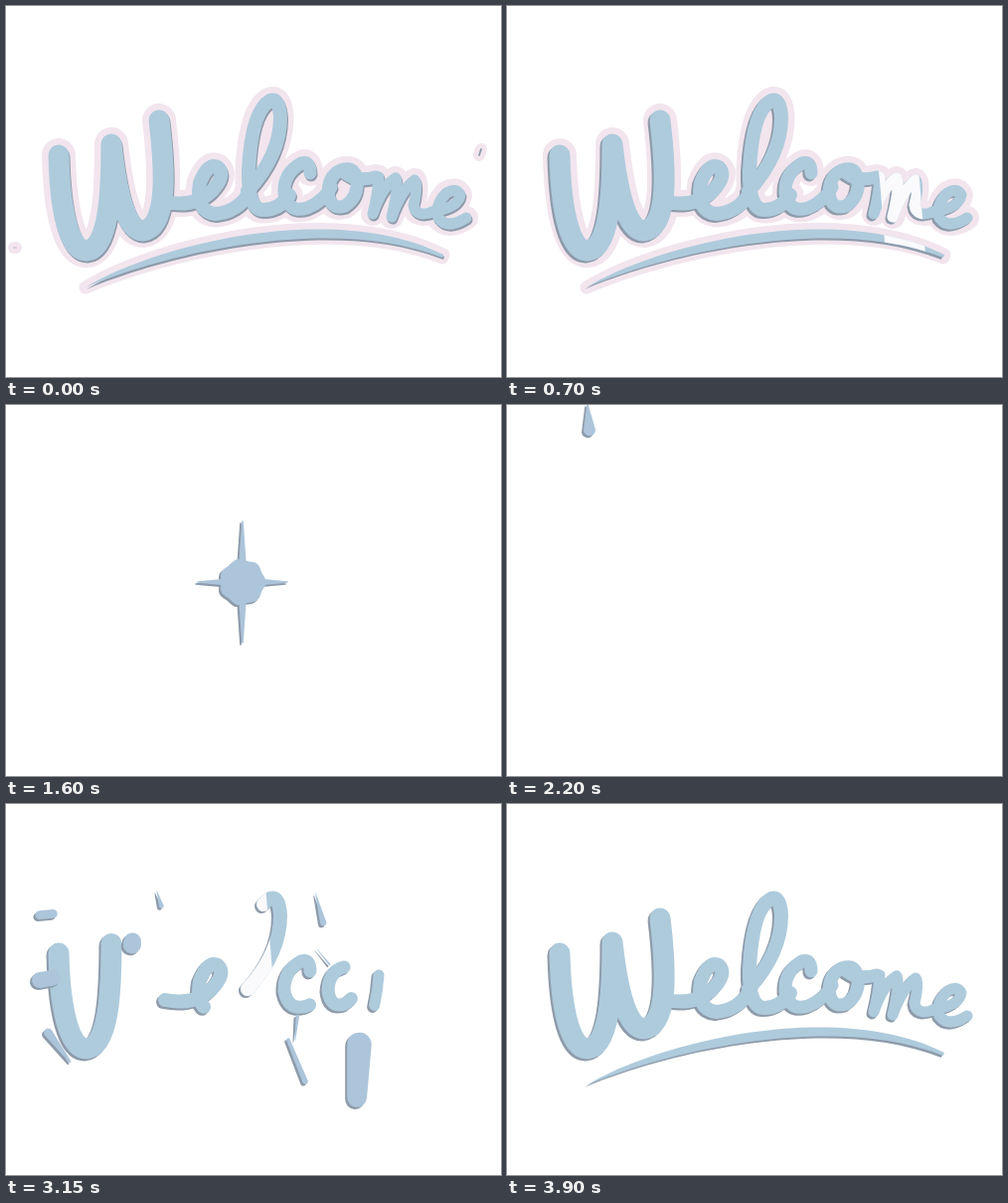
An HTML page with a canvas that plays this animation: 498 by 373 pixels, repeating every 3.95 s.

```html
<!DOCTYPE html>
<html lang="en">
<head>
<meta charset="utf-8">
<title>Welcome</title>
<style>
html, body { margin: 0; width: 100%; height: 100%; overflow: hidden; background: #fff; }
canvas { display: block; }
</style>
</head>
<body>
<canvas id="stage" width="498" height="373"></canvas>
<script>
const ctx = document.getElementById('stage').getContext('2d');
const LOOP = 3950, STEP = 50, MELTED = 1600, CX = 238, CY = 178;
const FACE = '#aecbdc', LIQUID = '#acc5da', SHADE = '#8e9baa', HALO = '#f2e5ee', SHINE = '#fafafd';

// Centre line of each letter, drawn with a round brush.
const letter = (width, d) => ({ width, path: new Path2D(d) });
const letters = [
  letter(21, 'M53 150C54 195 61 246 81 246C104 244 106 185 106 139C110 175 118 226 138 226C163 222 160 165 154 115'),
  letter(14, 'M160 197Q190 203 207 186Q222 170 213 162Q203 157 195 178Q190 207 211 209Q232 207 243 190'),
  letter(14, 'M243 186Q276 150 276 112Q275 92 266 95Q247 105 244 165Q243 205 259 205Q275 205 285 190'),
  letter(13, 'M306 168Q306 155 297 158Q279 168 280 188Q284 209 303 203Q320 196 327 182'),
  letter(13, 'M340 164Q325 168 324 187Q326 206 341 201Q355 192 353 174Q350 160 338 165Q350 178 372 172'),
  letter(11, 'M375 172Q374 190 369 209Q378 182 392 173Q396 178 388 212Q398 185 411 175Q415 180 410 200Q412 214 432 206'),
  letter(11, 'M428 207Q455 203 457 190Q453 182 443 188Q431 200 435 213Q444 225 463 213')
];
const swoosh = new Path2D('M219 238C150 250 60 278 62 299C70 312 130 304 180 291');
const swooshTail = new Path2D('M180 290C240 280 300 275 355 298');

const ramp = (t, from, to) => Math.max(0, Math.min(1, (t - from) / (to - from)));
const lerp = (a, b, k) => a + (b - a) * k;

// Hull of two circles: a capsule, drop or spike.
function taper(x1, y1, r1, x2, y2, r2, color) {
  const a = Math.atan2(y2 - y1, x2 - x1), quarter = Math.PI / 2;
  ctx.fillStyle = color;
  ctx.beginPath();
  ctx.arc(x1, y1, r1, a + quarter, a + 3 * quarter);
  ctx.arc(x2, y2, r2, a - quarter, a + quarter);
  ctx.fill();
}

function line(path, width, color, dash = []) {
  ctx.setLineDash(dash);
  ctx.lineWidth = width;
  ctx.strokeStyle = color;
  ctx.stroke(path);
  ctx.setLineDash([]);
}

function clipBand(left, width) {
  const slant = .08, top = left - 200 * slant, bottom = left + 173 * slant;
  ctx.beginPath();
  ctx.moveTo(top, 0);
  ctx.lineTo(top + width, 0);
  ctx.lineTo(bottom + width, 373);
  ctx.lineTo(bottom, 373);
  ctx.clip();
}

// Face over an offset shade, with bands of light on top.
function relief(draw, face, bands = [], dx = -2) {
  ctx.save();
  ctx.translate(dx, 2);
  draw(SHADE);
  ctx.restore();
  draw(face);
  for (const [left, width] of bands) {
    ctx.save();
    clipBand(left, width);
    draw(SHINE);
    ctx.restore();
  }
}

// The light crosses the stage twice in a loop at the same speed.
const shineLeft = t => t < MELTED ? 377 + .826 * (t - 700) : 437 + .826 * (t - 3400);

function underline(color, spread, sag, shown) {
  ctx.save();
  if (shown < 1) {
    ctx.beginPath();
    ctx.rect(0, 0, lerp(75, 450, shown), 373);
    ctx.clip();
  }
  const crescent = new Path2D(`M80 283C150 ${240 + sag} 330 ${195 + sag} 440 250
    L439 253C330 ${209 + sag} 160 ${248 + sag} 80 283`);
  ctx.fillStyle = color;
  ctx.fill(crescent);
  if (spread) line(crescent, spread, color);
  ctx.restore();
}

function word(t) {
  const leaving = t < MELTED;
  const melt = leaving ? ramp(t, 1150, 1560) ** 2 : 0, scale = 1 - .97 * melt;
  const sag = leaving ? 12 * ramp(t, 850, 1150) : 0;
  const shown = leaving ? 1 : ramp(t, 3450, 3700);
  const draw = (color, spread = 0) => {
    ctx.save();
    ctx.translate(CX, CY);
    ctx.scale(scale, scale);
    ctx.translate(-CX, -CY);
    if (shown) underline(color, spread, sag, shown);
    letters.forEach(({ width, path }, i) => {
      const written = leaving ? 1 : ramp(t, 3000 + i * 25, 3330);
      const dash = written < 1 ? [width * 23 * written, 999] : [];
      if (written) line(path, width * (1 + melt / 2) + spread, color, dash);
    });
    if (t > 3200 && t < 3650) {
      line(swoosh, 6, color, [300 * ramp(t, 3200, 3400) * (1 - ramp(t, 3400, 3650)), 999]);
    }
    ctx.restore();
  };
  if (t < 1150) draw(HALO, 13);
  relief(draw, FACE, [[shineLeft(t), 40]], t < STEP ? 1 : -2);
}

function splat(t) {
  const grow = ramp(t, 1350, MELTED), fly = ramp(t, 1650, 2050), size = grow * (1 - fly);
  relief(color => {
    for (let i = 0; i < 4; i++) {
      const a = i * Math.PI / 2, root = 80 * fly, tip = lerp((i % 2 ? 61 : 45) * grow, 80, fly);
      taper(CX + root * Math.cos(a), CY + root * Math.sin(a), 5 * size,
        CX + tip * Math.cos(a), CY + tip * Math.sin(a), .8 * size, color);
    }
    ctx.beginPath();
    for (let a = 0; a < Math.PI * 2; a += .05) {
      const r = (22.5 + Math.cos(7 * a)) * size;
      ctx.lineTo(CX + r * Math.cos(a), CY + r * Math.sin(a));
    }
    ctx.fillStyle = color;
    ctx.fill();
  }, LIQUID);
}

function rain(t) {
  for (let i = 0; i < 5; i++) {
    const y = 25 + .9 * (t - 2200 - i * 60), x = 83 + i * 97;
    relief(color => taper(x - 2, y - 25, .8, x, y, 6, color), LIQUID);
  }
}

// Pieces drift in from the edges, then shrink into the place of the word.
function liquid(t) {
  const join = ramp(t, 2900, 3250) ** 1.5, size = 1 - join, wait = Math.max(0, 2900 - t);
  const left = shineLeft(t), bands = [[left - 31, 15], [left, 40]];
  const piece = (x1, y1, r1, x2, y2, r2) => {
    const midX = (x1 + x2) / 2, midY = (y1 + y2) / 2;
    const away = Math.atan2(midY - CY, midX - CX), drift = .5 * wait;
    const x = lerp(midX + drift * Math.cos(away), lerp(midX, CX, .3), join);
    const y = lerp(midY + drift * Math.sin(away), lerp(midY, CY, .8), join);
    const halfX = (x2 - x1) / 2 * size, halfY = (y2 - y1) / 2 * size;
    relief(color => taper(x - halfX, y - halfY, r1 * size, x + halfX, y + halfY, r2 * size, color), LIQUID, bands);
  };
  for (let i = 0; i < 2; i++) {
    const r = 11 + 9 * i;
    piece(130 + 193 * i, 0, 1, 141 + 201 * i, 36 + 37 * i, 6 + 2 * i);
    piece(-20, 50 + 127 * i, r, 14, 47 + 124 * i, r);
    piece(307 - 24 * i, 240 + 40 * i, 4.5, 301 + 25 * i, 300 + 85 * i, 1 + 6 * i);
  }
  piece(103, 100, 22, 102, 108, 23);
  piece(321, 111, .5, 353, 150, 2.5);
  piece(-15, 270, 11, 40, 343, 3);
  piece(383, 286, 31, 377, 420, 25);
}

// Loose ticks right, above and left of the word.
function scraps(t) {
  const out = (t - 3400) * .03;
  ctx.globalAlpha = t < 3400 ? ramp(t, 3250, 3400) : 1 - ramp(t, 3400, 3850);
  for (let i = 0; i < 3; i++) {
    const a = -i * Math.PI / 2, x = CX + (208 * Math.abs(Math.cos(a)) + 45 + out) * Math.cos(a);
    const y = CY + (80 + out) * Math.sin(a);
    taper(x - 3, y + 4 * i % 8, .5, x + 3, y - 4 * i % 8, .8, SHADE);
  }
  line(swooshTail, 1.5, SHADE, [8, 4, 15, 7]);
  ctx.globalAlpha = 1;
}

// Two specks beside the word that float off and fade.
function specks(t) {
  const out = t * .03;
  ctx.globalAlpha = 1 - t / 500;
  for (const [r, color] of [[6, HALO], [.9, SHADE]]) {
    taper(8 - out, 243, r, 10 - out, 243, r, r > 1 ? color : '#d6cbd7');
    taper(478 + out, 144, r, 476 + out, 150, r, color);
  }
  ctx.globalAlpha = 1;
}

function frame(now) {
  const t = Math.floor((now % LOOP) / STEP) * STEP;
  ctx.fillStyle = '#fff';
  ctx.fillRect(0, 0, 498, 373);
  ctx.lineCap = ctx.lineJoin = 'round';
  if (t < MELTED || t >= 3000) word(t);
  if (t > 1350 && t < 2050) splat(t);
  if (t >= 2150 && t < 2900) rain(t);
  if (t >= 2450 && t < 3250) liquid(t);
  if (t >= 3250 && t < 3850) scraps(t);
  if (t < 500) specks(t);
  requestAnimationFrame(frame);
}
requestAnimationFrame(frame);
</script>
</body>
</html>
```
